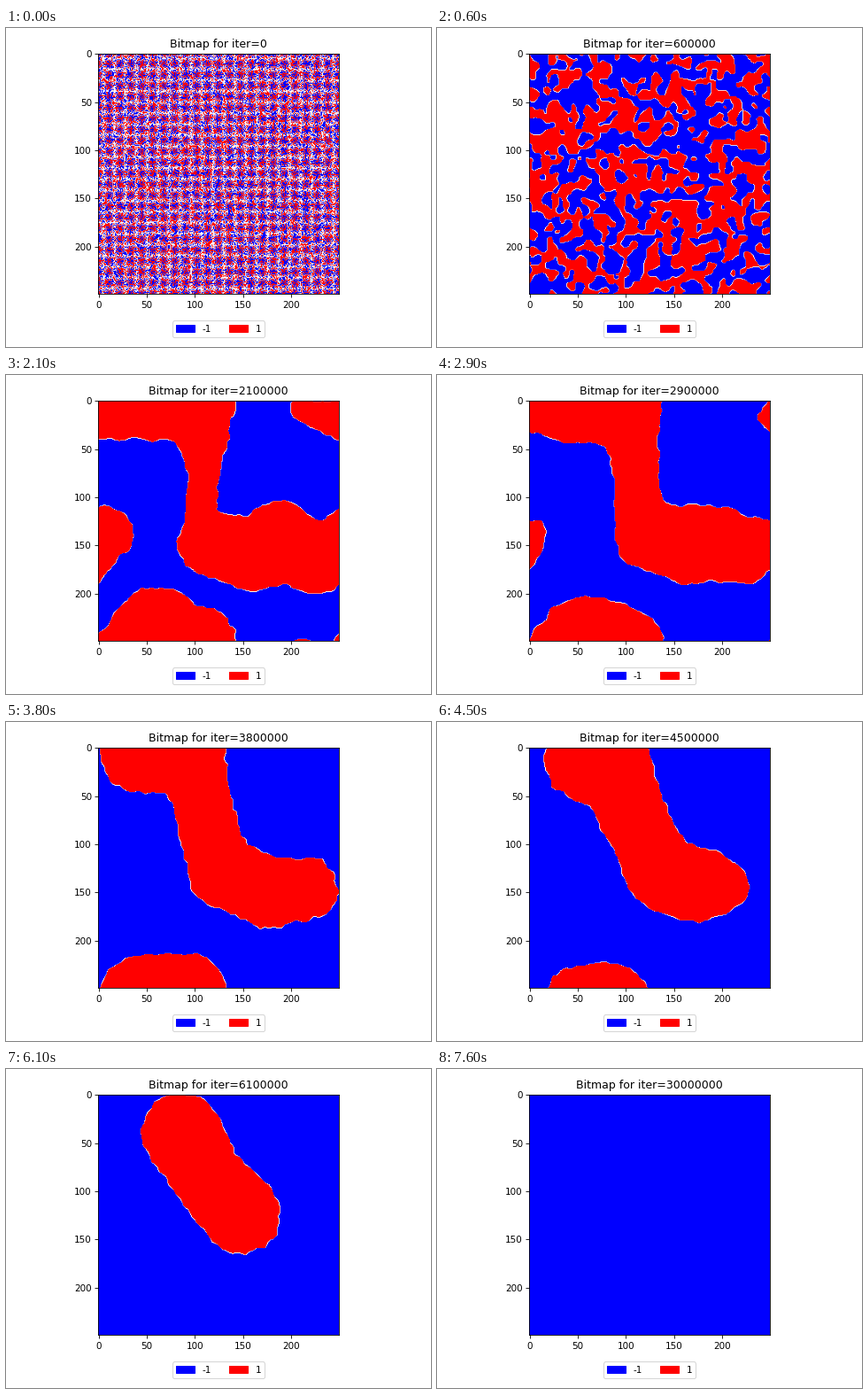
Recreate the animation shown at these times as a matplotlib script. Size 480x360 px, loop 7700 ms.

```python
import numpy as np
import matplotlib.pyplot as plt
from matplotlib.animation import FuncAnimation
from matplotlib.patches import Patch

N = 250          # lattice size
FRAMES = 77
STEP = 100_000   # iterations between two pictures
rng = np.random.default_rng(7)

# Chains of discs (x, y, radius) that outline the red domain at key times
KEYS = (21, 38, 53, 61, 75)
CHAINS = (
    [(-43, 9, 10), (0, 20, 21), (62, -6, 50), (105, 2, 38), (109, 50, 24),
     (109, 85, 15), (105, 120, 17), (115, 148, 33), (160, 160, 38),
     (188, 148, 43), (225, 165, 35), (260, 138, 27)],
    [(42, 7, 40), (92, 6, 41), (105, 50, 30), (117, 97, 31), (130, 130, 37),
     (175, 150, 36), (215, 148, 33)],
    [(74, 29, 46), (115, 85, 37), (145, 128, 42), (167, 134, 42)],
    [(86, 41, 42), (112, 84, 37), (148, 124, 41)],
    [(95, 54, 41), (131, 110, 41)],
)

ys, xs = np.mgrid[0:N, 0:N].astype(float)
freq = np.fft.fftfreq(N)
freq2 = np.add.outer(freq ** 2, freq ** 2)


def blur(a, sigma):
    return np.fft.ifft2(np.fft.fft2(a) * np.exp(-2 * (np.pi * sigma) ** 2 * freq2)).real


def unit(a):
    return (a - a.mean()) / a.std()


def depth(chain):
    """Signed depth inside a chain of tapered strokes on the torus."""
    best = np.full((N, N), -1e9)
    for dx in (-N, 0, N):
        for dy in (-N, 0):
            gx, gy = xs + dx, ys + dy
            for (x, y, r), (x2, y2, r2) in zip(chain, chain[1:]):
                ux, uy = x2 - x, y2 - y
                t = ((gx - x) * ux + (gy - y) * uy) / (ux * ux + uy * uy)
                t = np.clip(t, 0, 1)
                gap = np.hypot(gx - x - t * ux, gy - y - t * uy)
                best = np.maximum(best, r + t * (r2 - r) - gap)
    return blur(best, 2)


fields = [depth(c) for c in CHAINS]
spins = rng.choice([-1, 1], (N, N))
noise = rng.standard_normal((N, N))
luck = rng.random((N, N))
rough = [unit(blur(rng.standard_normal((N, N)), 3)) for _ in range(2)]
checker = (xs + ys) % 2 == 0


def relax(s, passes=4):
    """Zero-temperature sweeps on alternating sublattices."""
    for _ in range(passes):
        for mask in (checker, ~checker):
            h = sum(np.roll(s, d, axis) for d in (-1, 1) for axis in (0, 1))
            s = np.where(mask & (h != 0), np.sign(h), s)
    return s


def lattice(k):
    if k == 0:
        return spins
    if k == FRAMES - 1:
        return -np.ones((N, N))
    wobble = rough[0] * np.cos(k / 4) + rough[1] * np.sin(k / 4)
    if k < KEYS[0]:
        # random coarsening drifts into the first large domain
        sigma = 1.15 * np.sqrt(k) * (1 + (k / 17) ** 2)
        a = (k / KEYS[0]) ** 2
        u = (1 - a) * unit(blur(noise, sigma)) + a * (fields[0] + wobble) / 25
    else:
        pos = np.interp(k, KEYS, range(len(KEYS)))
        i = min(int(pos), len(KEYS) - 2)
        u = fields[i] + (pos - i) * (fields[i + 1] - fields[i]) + wobble
    s = relax(np.where(u > 0, 1, -1))
    # sites that have not been visited yet keep their first spin
    return np.where(luck < np.exp(-k * STEP / N ** 2), spins, s) if k < 6 else s


fig = plt.figure(figsize=(6.4, 4.8), dpi=75)
side = 271.75
ax = fig.add_axes([(240 - side / 2) / 480, 59.6 / 360, side / 480, side / 360])
im = ax.imshow(spins, cmap="bwr", vmin=-1, vmax=1)
title = ax.set_title("")
fig.legend(handles=[Patch(color="blue", label="-1"), Patch(color="red", label="1")],
           loc="lower center", bbox_to_anchor=(0.5, 11.25 / 360),
           borderaxespad=0, ncol=2)


def update(k):
    im.set_data(lattice(k))
    count = 30_000_000 if k == FRAMES - 1 else k * STEP
    title.set_text(f"Bitmap for iter={count}")
    return im, title


anim = FuncAnimation(fig, update, frames=FRAMES, interval=100, repeat=True, repeat_delay=0)
plt.show()
```
